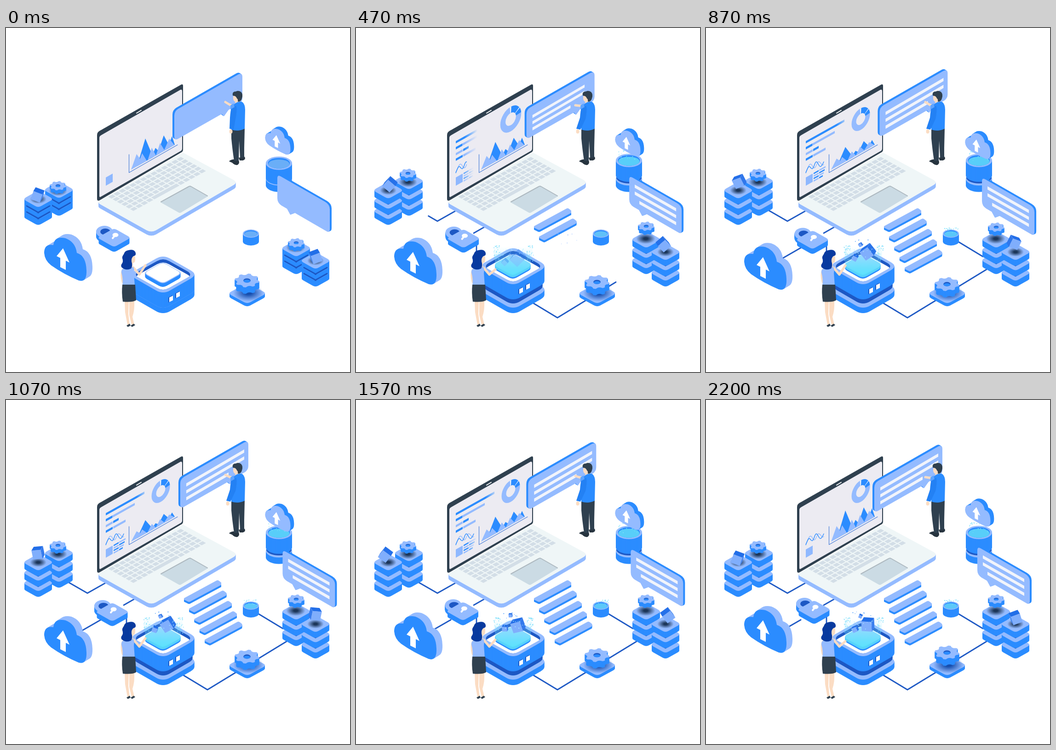
Recreate the animation shown at these times as an HTML page with a canvas. Size 748x748 px, loop 2.27 s.

```html
<!DOCTYPE html>
<html lang="en">
<head>
<meta charset="utf-8">
<title>Cloud data workspace</title>
<style>
html, body { margin: 0; width: 100%; height: 100%; overflow: hidden; background: #fff; }
canvas { display: block; width: 748px; height: 748px; }
</style>
</head>
<body>
<canvas id="stage" width="748" height="748"></canvas>
<script>
const ctx = document.getElementById('stage').getContext('2d');
const BLUE = '#2b8cff', LIGHT = '#94bbff', DEEP = '#1d58c4', SLATE = '#2f404f',
      SKIN = '#fbdcc3', WHITE = '#ffffff', PALE = '#f1f4fb', CYAN = '#4fe0fb';
const LOOP = 2270, LAST = 44, ISO = .56;

// ---------- helpers ----------
const rnd = k => { const v = Math.sin(k * 127.1 + 3.7) * 43758.5453; return v - Math.floor(v); };
// keyed value: pairs of step, value
function key(i, ...k) {
  if (i <= k[0]) return k[1];
  for (let n = 2; n < k.length; n += 2)
    if (i <= k[n]) return k[n - 1] + (k[n + 1] - k[n - 1]) * (i - k[n - 2]) / (k[n] - k[n - 2]);
  return k[k.length - 1];
}
function fill(path, color, x = 0, y = 0) {
  ctx.save();
  ctx.translate(x, y);
  ctx.fillStyle = color;
  ctx.fill(path);
  ctx.restore();
}
const shape = (d, color, x, y) => fill(new Path2D(d), color, x, y);
function line(d, color, width, x = 0, y = 0) {
  ctx.save();
  ctx.translate(x, y);
  ctx.strokeStyle = color;
  ctx.lineWidth = width;
  ctx.lineJoin = ctx.lineCap = 'round';
  ctx.stroke(new Path2D(d));
  ctx.restore();
}
function extrude(path, x, y, dx, dy, color) {
  const n = Math.ceil(Math.max(Math.abs(dx), Math.abs(dy)));
  for (let k = n; k > 0; k--) fill(path, color, x + dx * k / n, y + dy * k / n);
}
function oval(rx, ry) {
  const p = new Path2D();
  p.ellipse(0, 0, rx, ry, 0, 0, 7);
  return p;
}
// rounded rhombus given by its visible half sizes
function rhomb(w, h, q = .2) {
  const W = w / (1 - q / 2), H = h / (1 - q / 2), c = [[0, -H], [W, 0], [0, H], [-W, 0]];
  const p = new Path2D();
  c.forEach((v, k) => {
    const at = o => [v[0] + (o[0] - v[0]) * q, v[1] + (o[1] - v[1]) * q];
    p.lineTo(...at(c[(k + 3) % 4]));
    p.quadraticCurveTo(...v, ...at(c[(k + 1) % 4]));
  });
  p.closePath();
  return p;
}
function solid(path, x, y, depth, top = LIGHT, side = BLUE) {
  extrude(path, x, y, 0, depth, side);
  fill(path, top, x, y);
}
function shadow(x, y, r, color = '#1b3558') {
  ctx.save();
  ctx.translate(x, y);
  ctx.scale(1, .55);
  const g = ctx.createRadialGradient(0, 0, r * .2, 0, 0, r);
  g.addColorStop(0, color);
  g.addColorStop(1, color + '00');
  ctx.fillStyle = g;
  ctx.fillRect(-r, -r, 2 * r, 2 * r);
  ctx.restore();
}
function specks(x, y, w, h, n, seed, color) {
  ctx.fillStyle = color;
  for (let k = 0; k < n; k++) {
    const a = rnd(seed + k * 3), b = rnd(seed + k * 3 + 1), s = 1 + rnd(k) * .8;
    ctx.fillRect(x + a * w, y + b * b * h, s, s);
  }
}
// polyline drawn up to a share of its length
function trace(part, ...p) {
  let len = 0;
  for (let k = 2; k < p.length; k += 2) len += Math.hypot(p[k] - p[k - 2], p[k + 1] - p[k - 1]);
  let left = len * part;
  if (left <= 0) return;
  let d = `M${p[0]} ${p[1]}`;
  for (let k = 2; k < p.length && left > 0; k += 2) {
    const dx = p[k] - p[k - 2], dy = p[k + 1] - p[k - 1], seg = Math.hypot(dx, dy), f = Math.min(1, left / seg);
    d += `L${p[k - 2] + dx * f} ${p[k - 1] + dy * f}`;
    left -= seg;
  }
  line(d, DEEP, 2.8);
}
function cube(x, y, size, deg, flip = 1) {
  const a = deg * Math.PI / 180, c = Math.cos(a), s = Math.sin(a);
  const yaw = .24, pitch = .42;
  const view = ([X, Y, Z]) => {
    const x1 = X * Math.cos(yaw) - Z * Math.sin(yaw), z1 = X * Math.sin(yaw) + Z * Math.cos(yaw);
    return [x1 * flip, Y * Math.cos(pitch) + z1 * Math.sin(pitch), z1 * Math.cos(pitch) - Y * Math.sin(pitch)];
  };
  const e = [view([c, s, 0]), view([-s, c, 0]), view([0, 0, 1])];
  for (let f = 0; f < 6; f++) {
    const sign = f < 3 ? 1 : -1, n = e[f % 3].map(v => v * sign), u = e[(f + 1) % 3], v = e[(f + 2) % 3];
    if (n[2] <= 0) continue;
    const lum = Math.max(0, Math.min(1, .25 - n[0] * .15 * flip + n[1] * .5 + n[2] * .45));
    const at = (p, q) => `${x + (n[0] + u[0] * p + v[0] * q) * size / 2} ${y + (n[1] + u[1] * p + v[1] * q) * size / 2}`;
    const mix = (d, l) => Math.round(d + (l - d) * lum);
    shape(`M${at(-1, -1)}L${at(1, -1)}L${at(1, 1)}L${at(-1, 1)}Z`, `rgb(${mix(34, 140)},${mix(110, 183)},${mix(232, 255)})`);
  }
}
function gear(x, y, w, depth) {
  const p = new Path2D();
  for (let k = 0; k < 32; k++) {
    const r = k % 4 < 2 ? w : w * .82, a = (k + .5) * Math.PI / 16;
    p.lineTo(Math.cos(a) * r, Math.sin(a) * r * .56);
  }
  p.closePath();
  solid(p, x, y, depth);
  fill(oval(w * .29, w * .17), DEEP, x, y);
  fill(oval(w * .27, w * .12), BLUE, x, y + w * .05);
}
const tile = rhomb(30, 17, .2);
function stack(x, bottom, gap) {
  const base = bottom - 30;
  for (let k = 0; k < 3; k++) {
    const y = base - k * gap;
    if (k) line('M-25 1.5L0 16L25 1.5', DEEP, 4, x, y + 13);
    solid(tile, x, y, 13);
  }
  // dark seams while the tiles are still closed
  const seam = key(gap, 13, 1, 19, 0);
  ctx.globalAlpha = seam;
  if (seam) for (let k = 1; k < 3; k++) line('M-25 2L0 16L25 2', DEEP, 3, x, base - k * gap + 13);
  ctx.globalAlpha = 1;
  return base - 2 * gap;
}
function drum(x, y, rx, ry, depth, glow) {
  solid(oval(rx, ry), x, y, depth);
  fill(oval(rx * .84, ry * .8), BLUE, x, y);
  fill(oval(rx * .8, ry * .68), '#6aaef7', x, y + ry * .12);
  if (glow > 0) {
    ctx.globalAlpha = glow * .65;
    fill(oval(rx * .8, ry * .68), CYAN, x, y + ry * .12);
    ctx.globalAlpha = 1;
  }
}

// ---------- parts ----------
function links(i) {
  trace(key(i, 2.6, 0, 11.7, 1), 223, 394, 177, 420, 130, 393);
  trace(key(i, 2, 0, 5, 1), 284, 430, 256, 446);
  trace(key(i, 3, 0, 5, 1), 262, 470, 262, 492);
  trace(key(i, 10, 0, 14, 1), 206, 478, 166, 501);
  trace(key(i, 5, 0, 9, .8, 11, 1), 385, 598, 438, 630, 610, 525);
  trace(key(i, 10, 0, 14, 1), 549, 465, 602, 497);
}
function stacks(i, S) {
  const t = i / LAST, spin = 16 + 180 * (t - .13 * Math.sin(Math.PI * t)), sway = 5 * Math.sin(2 * Math.PI * t);
  const gl = key(i, 0, 13, 4, 22.5), gr = key(i, 0, 13, 5, 20.2, 8, 22.5);
  let y = stack(115, 408, gl);
  shadow(113, y + 2, 20);
  gear(113, y - key(i, 0, 9, 5, 17), 18, 8);
  y = stack(70, 428, gl);
  shadow(70, y, 18);
  cube(69 + sway, y - 9 - 12 * S, 21, spin);
  y = stack(631, 535, gr);
  shadow(630, y - 2, 21);
  gear(631, y - key(i, 0, 12, 5, 25, 9, 29, 17, 27), 18, 9);
  y = stack(673, 562, gr);
  shadow(673, y, 18);
  cube(673 - sway, y - key(i, 0, 9, 5, 14) - 8 * S, 21, spin, -1);
}
function cloud(x, y, scale, front, side) {
  const body = new Path2D('M83 489Q83 469 103 472Q105 452 129 457Q151 465 154 489Q174 495 175 527Q176 554 158 549Q125 535 98 516Q84 505 83 489Z');
  ctx.save();
  ctx.translate(x, y);
  ctx.scale(scale, scale);
  extrude(body, 0, 0, 13, -8, side);
  fill(body, front);
  shape('M124 479L110 496L118 500V520L130 526V506L138 510Z', WHITE);
  ctx.restore();
}
function lock(x, y) {
  ctx.save();
  ctx.translate(x, y);
  solid(oval(18, 13), 214, 443, 10);
  fill(oval(11, 7), DEEP, 216, 443);
  solid(rhomb(33.5, 19, .16), 235, 456, 11.5);
  fill(oval(6.5, 4.5), WHITE, 238, 450);
  line('M237 451L232 457', WHITE, 4);
  ctx.restore();
}
function laptop() {
  const top = new Path2D('M203 376L385 271L494 330Q505 336 494 342L326 440Q316 445 306 440L206 384Q198 380 203 376Z');
  solid(top, 0, 0, 9, '#eff6f7', LIGHT);
  // keyboard plane
  ctx.save();
  ctx.transform(160, -88, 57, 32, 220, 367);
  ctx.fillStyle = '#d3dee7';
  for (let r = 0; r < 6; r++)
    for (let c = 0; c < 14; c++) {
      if (r === 5 && c > 4 && c < 9) continue;
      const span = r === 5 && c === 4 ? 5 : 1;
      ctx.fillRect((c + .1) / 14, (r + .12) / 6, (span - .2) / 14, .76 / 6);
    }
  ctx.restore();
  shape('M336 379L397 345Q400 343 403 345L439 366L381 401Q378 403 375 401Z', '#cbdbe4');
  line('M337 378L397 345Q400 343 403 345L438 365', '#aeb9c0', 2);
  shape('M198 233Q198 227 203 224L381 123Q385 121 385 126V264Q385 268 382 270L203 375Q198 377 198 371Z', SLATE);
  shape('M203 239Q203 235 207 233L378 135Q383 132 383 138V262Q383 266 379 268L206 367Q203 369 203 365Z', '#ecebf2');
  line('M284 185L294 179', WHITE, 2);
}
// slanted strip on the laptop display, faded out towards x = edge
function strip(x, y, len, h, color, edge) {
  if (edge <= x) return;
  const g = ctx.createLinearGradient(edge - 28, 0, edge, 0);
  g.addColorStop(0, color);
  g.addColorStop(1, color + '00');
  shape(`M${x} ${y}l${len} ${-len * ISO}v${h}l${-len} ${len * ISO}Z`, g);
}
function display(i, S) {
  const a = key(i, 0, 215, 5, 238, 9, 264, 17, 340, 27, 340, 37, 264, 44, 215);
  strip(217, 246, 84, 5, BLUE, Math.min(a, 312));
  strip(217, 259, 63, 5, LIGHT, a);
  strip(217, 259, 14, 5, BLUE, a);
  strip(217, 272, 15, 5, LIGHT, a);
  strip(233, 263, 12, 5, BLUE, a);
  strip(217, 284, 15, 5, BLUE, a);
  strip(233, 275, 27, 5, LIGHT, a);
  const b = key(i, 4, 232, 9, 256, 17, 290, 28, 290, 36, 232);
  for (let k = 0; k < 4; k++) {
    strip(234, 315 + k * 5.4, 11, 3, k % 2 ? LIGHT : BLUE, b);
    strip(246, 308 + k * 5.4, 14 - k * 2, 3, k % 2 ? BLUE : LIGHT, b);
  }
  strip(217, 325, 15, 18, '#8fb8ff', 400);
  // wavy graph
  ctx.save();
  ctx.beginPath();
  ctx.rect(215, 280, key(i, 2, 0, 5, 10, 9, 26, 15, 42), 40);
  ctx.clip();
  line('M217 313C221 309 222 297 227 296S231 306 236 304S241 289 246 291S251 301 256 297', LIGHT, 1.4);
  line('M217 315C222 301 224 299 227 303S232 309 236 297S243 294 246 299S252 300 256 291', BLUE, 1.4);
  ctx.restore();
  // peaks
  const base = x => 308 - (x - 272) * .57, amp = 1 - .42 * S;
  const peak = (x, l, r, h, color) => shape(`M${x - l} ${base(x - l)}L${x} ${base(x) - h * amp}L${x + r} ${base(x + r)}Z`, color);
  peak(303, 18, 17, 50, BLUE);
  peak(325, 10, 11, 17, BLUE);
  peak(343, 14, 14, 34, BLUE);
  peak(361, 10, 6, 22, BLUE);
  peak(284, 12, 14, 27, LIGHT);
  peak(296, 10, 10, 22, LIGHT);
  peak(317, 9, 9, 22, LIGHT);
  peak(335, 9, 10, 22, LIGHT);
  peak(355, 12, 11, 20, LIGHT);
  line('M267.5 275V314.5L373 254', '#4a7fd8', 1.2);
  // ring chart
  const z = key(i, 2, 0, 5, .65, 9, 1.14, 13, 1);
  if (z > 0) {
    ctx.save();
    ctx.transform(z, -ISO * z, 0, 1.17 * z, 336.5, 198);
    ctx.lineWidth = 10;
    const arc = (from, to, color) => {
      ctx.beginPath();
      ctx.arc(0, 0, 15, from, to);
      ctx.strokeStyle = color;
      ctx.stroke();
    };
    arc(0, 7, LIGHT);
    arc(-1.57, -.1, BLUE);
    arc(-1.66, -1.52, PALE);
    arc(-.62, -.54, PALE);
    ctx.restore();
  }
}
function leftBubble(i, S) {
  ctx.save();
  ctx.translate(13 * S, -8.8 * S);
  const p = new Path2D('M366 191Q366 181 374 176L505 101Q514 97 514 106V152Q514 161 506 166L484 178L474 192L469 187L374 241Q366 245 366 236Z');
  extrude(p, 0, 0, -4, -2.5, BLUE);
  fill(p, LIGHT);
  const z = key(i, 2, 0, 5, .38, 9, .9, 12, 1);
  ctx.translate(379, 215);
  ctx.scale(z, z);
  [[-25, 126], [-10, 126], [5, 92]].forEach(([y, len]) =>
    shape(`M0 ${y}l${len} ${-len * .585}v7l${-len} ${len * .585}Z`, PALE));
  ctx.restore();
}
function rightBubble(i, S) {
  ctx.save();
  ctx.translate(11.5 * S, 7.5 * S);
  const p = new Path2D('M590 327Q590 318 598 323L694 378Q704 384 704 394V437Q704 446 697 442L628 402L618 406L611 393L599 386Q590 380 590 370Z');
  extrude(p, 0, 0, 4, -2, BLUE);
  fill(p, LIGHT);
  const z = key(i, 2, 0, 5, .7, 9, 1);
  ctx.translate(692, 408);
  ctx.scale(z, z);
  [[-19, 90], [-4, 90], [11, 80]].forEach(([y, len]) =>
    shape(`M0 ${y}l${-len} ${-len * .57}v7l${len} ${len * .57}Z`, PALE));
  ctx.restore();
}
function man(i, wave) {
  const hand = key(i, 5, 0, 9, -7);
  line(`M492 169L485 ${166 + wave * 3}L477 ${161 + wave * 7}`, SKIN, 5);
  shape('M487 288Q495 283 506 288Q509 294 503 298Q496 298 492 293L485 290Z', '#27343f');
  shape('M506 282L519 280Q522 286 515 288L508 288Z', '#27343f');
  shape('M490 219Q505 226 519 218L518 260V282H509L507 245L506 289H496Q492 262 490 240Z', SLATE);
  shape('M499 156H509V167H498Z', SKIN);
  fill(oval(3.5, 4.5), SKIN, 489 + hand, 225);
  shape('M497 165Q506 158 514 161Q520 166 520 178L519 219Q505 226 490 221V185Q487 170 497 165Z', BLUE);
  shape(`M491 168Q488 180 487 195L${486 + hand} 219L${495 + hand} 221L499 198Q503 180 501 170Z`, '#2381f4');
  shape('M488 168L495 164L497 172L488 177Z', '#5ea4ff');
  shape('M494 148Q493 159 499 161L508 160L509 146Z', SKIN);
  shape('M493 147Q491 138 500 138Q505 135 511 139Q516 144 513 153Q511 161 504 160Q505 155 502 153Q500 147 493 147Z', SLATE);
}
function woman(wave) {
  line('M254 526Q250 537 254 552', SKIN, 5);
  shape('M258 594H267L266 622L269 645H264L259 618ZM268 594H279Q280 613 275 628L279 645H273L268 624Z', SKIN);
  shape('M262 647L269 643L271 647L265 650ZM271 647L278 643L281 646L274 650Z', SLATE);
  line(`M277 521L290 536L303 ${516 + wave * 9}`, SKIN, 5);
  shape('M255 523Q266 517 276 519Q280 523 278 533L280 560H253Q255 546 251 532Q250 526 255 523Z', LIGHT);
  shape('M253 558H281L283 592Q275 597 254 595Q251 576 253 558Z', SLATE);
  shape('M268 492Q280 493 281 499Q282 511 276 511L275 520L267 521Z', SKIN);
  shape('M267 483Q280 480 282 490Q283 495 277 496Q272 500 273 508Q276 517 272 523Q264 527 257 524Q248 520 251 514Q256 508 253 501Q252 497 256 492Q258 484 267 483Z', '#083a9f');
}
function server(i, t) {
  const y = 536 - key(i, 0, 0, 5, 9, 9, 18), body = rhomb(68, 39, .2);
  solid(body, 341.5, 569, 12);
  if (y < 528) extrude(rhomb(64, 37, .2), 341.5, y + 33, 0, 562 - y - 33, DEEP);
  solid(body, 341.5, y, 33);
  const well = rhomb(59, 33, .2);
  fill(well, DEEP, 341.5, y);
  ctx.save();
  ctx.translate(341.5, y);
  ctx.clip(well);
  fill(well, WHITE, 0, 7);
  ctx.restore();
  [[354, 47], [369, 38]].forEach(([x, dy]) => {
    shape('M0 4L9 -1V10L0 15Z', DEEP, x - 1, y + dy - 1);
    shape('M1 4L9 0V10L1 14Z', WHITE, x, y + dy - 1);
  });
  const chip = rhomb(38.5, 22, .2), cy = y - 3, glow = key(i, 5, 0, 9, 1);
  solid(chip, 341, cy, 8);
  fill(rhomb(36.5, 20.5, .2), WHITE, 341, cy - .5);
  if (!glow) return;
  ctx.save();
  ctx.globalAlpha = glow;
  const g = ctx.createLinearGradient(0, -24, 0, 28);
  g.addColorStop(0, '#a7d4ff');
  g.addColorStop(1, '#48e2fa');
  extrude(chip, 341, cy, 0, 5, '#56d3fb');
  fill(chip, g, 341, cy);
  const beam = ctx.createLinearGradient(0, cy - 40, 0, cy + 10);
  beam.addColorStop(0, '#8feaff00');
  beam.addColorStop(1, '#66e2ff88');
  shape(`M299 ${cy - 40}H385L379 ${cy}L341 ${cy + 22}L303 ${cy}Z`, beam);
  ctx.restore();
  const rise = key(i, 6, 0, 17, 1), bob = Math.sin(2 * Math.PI * t) * 2;
  ctx.globalAlpha = key(i, 6, 0, 10, .5, 15, 1);
  cube(352, 507 - 19 * rise - bob, 23, 28 + 60 * t);
  cube(324, 510 - 12 * rise + bob, 11, 60 - 90 * t);
  cube(336, 498 - 28 * rise + bob, 7, 20 + 90 * t);
  ctx.globalAlpha = glow;
  specks(299, 473, 14, 34, 34, i % 3 * 50, '#74dcfb');
  specks(371, 473, 14, 34, 34, i % 3 * 50 + 9, '#74dcfb');
  specks(312, 480, 58, 20, 18, i % 3 * 50 + 21, '#a9ecff');
  if (i > 14) specks(318, 460, 40, 14, 6, i % 4 * 40, BLUE);
  ctx.globalAlpha = 1;
}
function floorBars(i) {
  const slat = new Path2D('M387 431L457 393Q460 391 463 393L468 397V402L401 438Q398 440 395 438L387 434Z');
  [4, 8, 11, 14, 16].forEach((start, k) => {
    const x = 11.3 * k, y = 22.5 * k;
    if (i >= start - 3 && i < start) specks(392 + x, 402 + y, 76, 32, 7, start + i * 7, LIGHT);
    ctx.globalAlpha = key(i, start - 1, 0, start + 1, 1);
    solid(slat, x, y, 4.5);
    ctx.globalAlpha = 1;
  });
}
function drums(i) {
  const lift = key(i, 0, 0, 5, 5, 9, 6), mist = key(i, 5, 0, 9, 1);
  solid(oval(28.5, 14.5), 593.5, 328, 14);
  fill(oval(27.5, 13), DEEP, 593.5, 325);
  drum(593.5, 294 - lift, 28.5, 14.5, 32, key(i, 2, 0, 5, 1));
  ctx.globalAlpha = mist;
  specks(570, 266, 46, 22, 34, i % 3 * 60, '#7fe2fb');
  ctx.globalAlpha = 1;
  drum(532.5, 447, 17.5, 9, 17, key(i, 6, 0, 10, .8));
  ctx.globalAlpha = key(i, 9, 0, 13, 1);
  specks(517, 434, 31, 12, 22, i % 3 * 60 + 7, '#7fe2fb');
  ctx.globalAlpha = 1;
}
function gearPad(S) {
  solid(rhomb(38.5, 21, .16), 524.5, 577, 7);
  shadow(527, 576, 33, '#174fae');
  gear(524, 549 + 9 * S, 27, 14);
}

function draw(i) {
  const t = i / LAST, S = Math.sin(Math.PI * t) ** 2, wave = (1 - Math.cos(Math.PI * i / 9)) / 2;
  ctx.fillStyle = WHITE;
  ctx.fillRect(0, 0, 748, 748);
  links(i);
  stacks(i, S);
  cloud(0, 22 * S, 1, BLUE, LIGHT);
  lock(-4 * S, 5 * S);
  laptop();
  display(i, S);
  floorBars(i);
  leftBubble(i, S);
  man(i, wave);
  drums(i);
  cloud(513.5, -54.5 + 11 * S, .6, LIGHT, BLUE);
  rightBubble(i, S);
  gearPad(S);
  server(i, t);
  woman(wave);
}

// ---------- clock: two uneven steps in every 100 ms ----------
const start = performance.now();
let shown = -1;
function tick() {
  const ms = (performance.now() - start) % LOOP;
  const step = Math.min(LAST, 2 * Math.floor(ms / 100) + (ms % 100 >= 70 ? 1 : 0));
  if (step !== shown) draw(shown = step);
  requestAnimationFrame(tick);
}
tick();
</script>
</body>
</html>
```
